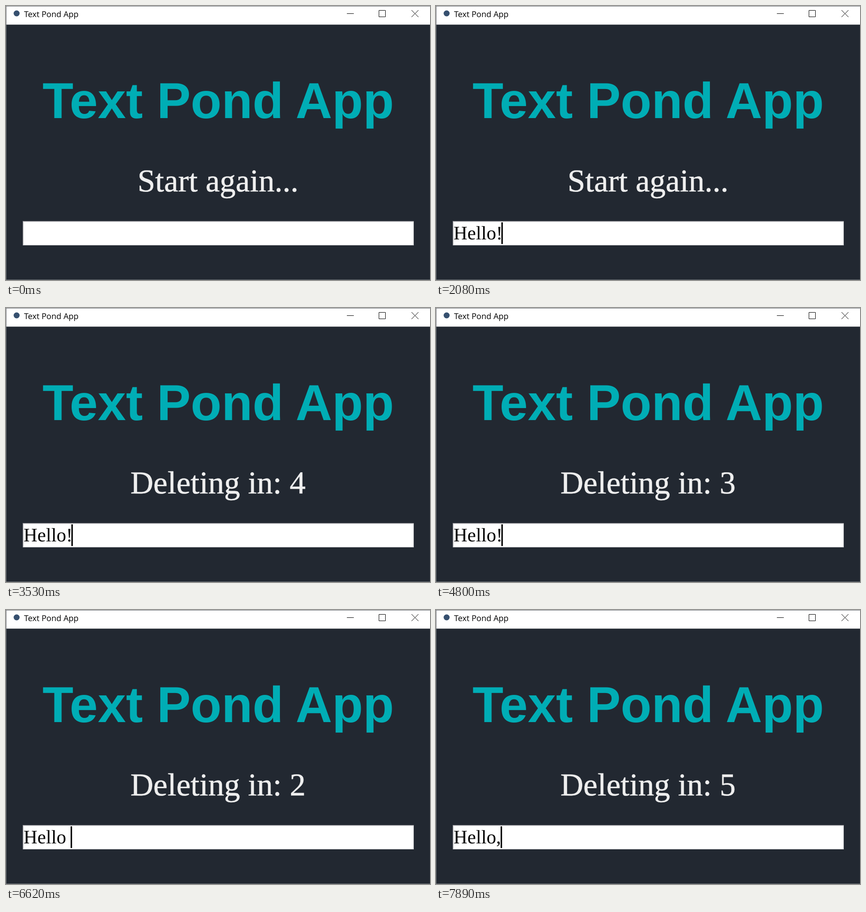
An HTML page for the animation above (8000 ms loop, 918 px wide and 594 px high).

```html
<!DOCTYPE html>
<html lang="en">
<head>
<meta charset="utf-8">
<title>Text Pond App</title>
<style>
  html, body { margin: 0; width: 100%; height: 100%; overflow: hidden; background: #222831; }
  svg { display: block; width: 918px; height: 594px; }
  text { font-kerning: none; text-rendering: geometricPrecision; white-space: pre; }
  .caption { font: 17.6px "Open Sans", "Noto Sans", sans-serif; fill: #000; }
  .heading { font: bold 109.6px "Liberation Sans", Arial, sans-serif; fill: #00adb5; text-anchor: middle; }
  .status { font: 69px "Liberation Serif", "Times New Roman", serif; fill: #eee; stroke: #eee; stroke-width: .6; text-anchor: middle; }
  .entry { font: 41.5px "Liberation Serif", "Times New Roman", serif; fill: #000; }
  .line { fill: none; stroke: #000; }
</style>
</head>
<body>
<svg viewBox="0 0 918 594">
  <rect width="918" height="594" fill="#222831"/>
  <rect width="918" height="40.4" fill="#fff"/>
  <path d="M0 .5H918M.5 0V594M0 593.5H918" fill="none" stroke="#70747a"/>

  <circle cx="23" cy="16" r="6.5" fill="#36506f"/>
  <text class="caption" x="39" y="24">Text Pond App</text>
  <path class="line" d="M738 16.5H753M807.5 9.5H821.5V23.5H807.5Z"/>
  <path class="line" d="M878 9L893 24M893 9L878 24"/>

  <text class="heading" x="459.5" y="243">Text Pond App</text>
  <text class="status" id="status" x="459" y="402"></text>

  <rect x="36" y="466" width="847" height="53" fill="#fff"/>
  <path d="M36 466.5H883M36.5 466V519" fill="none" stroke="#808086"/>
  <path d="M37 467.5H882M37.5 467V518" fill="none" stroke="#c8c8ca"/>
  <path d="M37 518.5H883M882.5 467V519" fill="none" stroke="#b8babd"/>
  <text class="entry" id="entry" x="38" y="506"></text>
  <rect id="caret" y="469" width="3.2" height="47"/>
</svg>
<script>
  const LOOP = 8000;
  const el = id => document.getElementById(id);
  const status = el("status"), entry = el("entry"), caret = el("caret");

  const statusSteps = [
    [0, "Start again..."],
    [2510, "Deleting in: 5"],
    [3530, "Deleting in: 4"],
    [4460, "Deleting in: 3"],
    [5480, "Deleting in: 2"],
    [7520, "Deleting in: 5"]
  ];

  const entrySteps = [
    [0, ""], [360, "H"], [540, "He"], [630, "Hel"], [720, "Hell"],
    [900, "Hello"], [1180, "Hello!"], [6160, "Hello"], [6250, "Hello "],
    [7610, "Hello"], [7890, "Hello,"]
  ];

  // The caret starts hidden and flips at each of these times.
  const blinks = [
    270, 900, 1180, 1800, 2080, 2690, 2970, 3620, 3900,
    4520, 4800, 5390, 5670, 6250, 6620, 7150, 7520
  ];

  const caretX = {
    "": 37.5, "H": 66.6, "He": 85, "Hel": 96.8, "Hell": 108.4,
    "Hello": 129.4, "Hello!": 141.5, "Hello ": 139.9, "Hello,": 139.9
  };

  const valueAt = (steps, t) => steps.findLast(([start]) => start <= t)[1];

  function setText(node, value) {
    if (node.textContent !== value) node.textContent = value;
  }

  function draw() {
    const t = performance.now() % LOOP;
    const typed = valueAt(entrySteps, t);
    const shown = blinks.filter(b => b <= t).length % 2 === 1;
    setText(status, valueAt(statusSteps, t));
    setText(entry, typed);
    caret.setAttribute("x", caretX[typed]);
    caret.setAttribute("visibility", shown ? "visible" : "hidden");
    requestAnimationFrame(draw);
  }

  draw();
</script>
</body>
</html>
```
